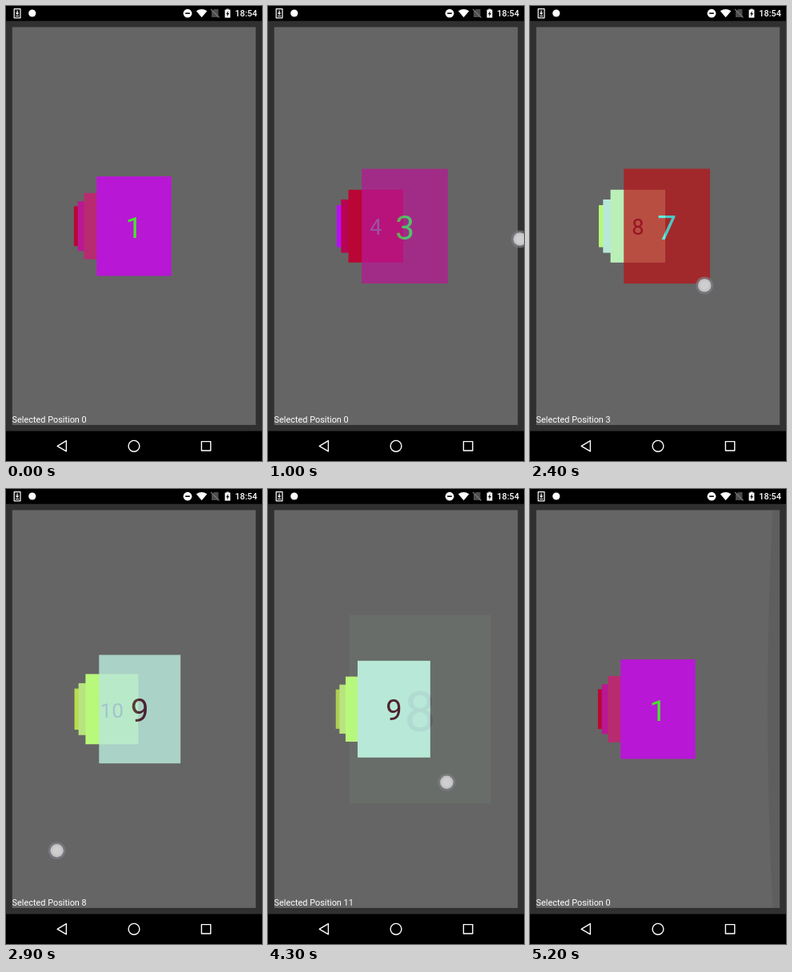
An HTML page with a canvas that plays this animation: 320x569 px, repeating every 5700 ms.

```html
<!DOCTYPE html>
<html lang="en">
<head>
<meta charset="utf-8">
<title>Card stack</title>
<style>
html, body { margin: 0; width: 100%; height: 100%; overflow: hidden; background: #000; }
canvas { display: block; width: 320px; height: 569px; }
</style>
</head>
<body>
<canvas id="stage" width="320" height="569"></canvas>
<script>
const W = 320, H = 569;
const screen2d = document.getElementById('stage').getContext('2d');
const layer = Object.assign(document.createElement('canvas'), { width: W, height: H });
const layer2d = layer.getContext('2d');
let ctx = screen2d;

const LOOP = 5700, STEP = 100, LAST = 5200;
const FONT = 'Roboto, sans-serif';
const PANEL = { x: 7.8, y: 26.4, w: 304.4, h: 497.5 };
const CARD = { w: 93.4, h: 124.4, x: 160, y: 275.3, size: 37.33, baseline: 14.6 };
const DRAG = 94; // finger pixels per card

const COLORS = ['#b817d5', '#b82b70', '#b81894', '#ba0634', '#b80452', '#b80ef8',
  '#b81418', '#baf0b8', '#b8e8da', '#b8f87a', '#b8e480', '#b8dc50'];

// Each swipe eases the stack to `end`; the finger starts at (x, y)
const SWIPES = [
  { from: 370, to: 1300, end: 3, x: 102, y: 398, settles: true },
  { from: 1390, to: 2000, end: 5, x: 136, y: 384 },
  { from: 2075, to: 2800, end: 8, x: 99, y: 409, settles: true },
  { from: 2800, to: 3500, end: 11, x: 48, y: 460, settles: true },
  { from: 3800, to: 4195, end: 8.45, x: 272, y: 359 },
  { from: 4195, to: 4900, end: 0, x: 271, y: 343, settles: true }
];

const clamp = v => Math.max(0, Math.min(1, v));
const smooth = u => u * u * (3 - 2 * u);

function stackAt(t) {
  let pos = 0, selected = 0, finger = null;
  for (const s of SWIPES) {
    if (t < s.from) break;
    const moved = (s.end - pos) * smooth(clamp((t - s.from) / (s.to - s.from)));
    pos += moved;
    finger = t < s.to ? { x: s.x + DRAG * moved, y: s.y - DRAG * moved / 2 } : null;
    if (s.settles && t >= s.to) selected = s.end;
  }
  return { pos, selected, finger };
}

function rect(x, y, w, h, color) {
  ctx.fillStyle = color;
  ctx.fillRect(x, y, w, h);
}

function disc(x, y, r, color) {
  ctx.fillStyle = color;
  ctx.beginPath();
  ctx.arc(x, y, r, 0, Math.PI * 2);
  ctx.fill();
}

function poly(points, color) {
  ctx.fillStyle = color;
  ctx.beginPath();
  points.forEach(([x, y]) => ctx.lineTo(x, y));
  ctx.closePath();
  ctx.fill();
}

function label(text, x, y, size, color, align = 'left', weight = 400) {
  ctx.font = `${weight} ${size}px ${FONT}`;
  ctx.textAlign = align;
  ctx.fillStyle = color;
  ctx.fillText(text, x, y);
}

function inverse(hex) {
  const value = 0xffffff - parseInt(hex.slice(1), 16);
  return '#' + value.toString(16).padStart(6, '0');
}

// The card and its number fade as one layer
function drawCard(index, d) {
  const scale = 1 / (1 + d / 2);
  const x = CARD.x - Math.sign(d) * DRAG * (1 - 1 / (1 + Math.abs(d) / 2));
  const w = CARD.w * scale, h = CARD.h * scale;
  ctx = layer2d;
  ctx.clearRect(0, 0, W, H);
  rect(x - w / 2, CARD.y - h / 2, w, h, COLORS[index]);
  label(index + 1, x, CARD.y + CARD.baseline * scale, CARD.size * scale,
    inverse(COLORS[index]), 'center');
  ctx = screen2d;
  ctx.globalAlpha = clamp(Math.min(1 + d, 7 - 2 * d));
  ctx.drawImage(layer, 0, 0);
  ctx.globalAlpha = 1;
}

function drawStack(pos) {
  for (let i = COLORS.length - 1; i >= 0; i--) {
    const d = i - pos;
    if (d > -1 && d < 3.5) drawCard(i, d);
  }
}

function drawGlow(t) {
  if (t < 4900) return;
  const fade = (1 - clamp((t - 4900) / 600)) ** 2;
  const r = 747, half = PANEL.h / 2, right = PANEL.x + PANEL.w;
  const edge = [[right, PANEL.y]];
  for (let u = -half; u <= half; u += half / 20) {
    edge.push([right - .6 * fade * (100 - r + Math.sqrt(r * r - u * u)), CARD.y + u]);
  }
  edge.push([right, PANEL.y + PANEL.h]);
  poly(edge, `rgba(33,33,33,${.4 * fade})`);
}

function drawFinger(finger) {
  if (!finger || finger.x < 45 || finger.x > W) return;
  disc(finger.x, finger.y, 11, 'rgba(125,125,132,.7)');
  disc(finger.x, finger.y, 8.2, '#c4c4c6');
  disc(finger.x, finger.y, 5.5, '#cecece');
}

function drawStatusBar() {
  rect(0, 0, W, 18.7, '#000');
  ctx.strokeStyle = '#fff';
  ctx.lineWidth = 1.2;
  ctx.strokeRect(10.2, 3.6, 7.8, 11.2);
  rect(13.5, 5.5, 1.2, 4, '#fff');
  poly([[11.8, 8.5], [16.4, 8.5], [14.1, 11.2]], '#fff');
  rect(12, 12, 4.2, 1, '#fff');
  disc(32.8, 9, 4.6, '#fff');

  disc(227, 9.2, 5.4, '#fff');
  rect(224.2, 8.4, 5.6, 1.6, '#000');

  ctx.fillStyle = '#fff';
  ctx.beginPath();
  ctx.moveTo(244.6, 14.2);
  ctx.lineTo(237.8, 6.2);
  ctx.quadraticCurveTo(244.6, 1.8, 251.4, 6.2);
  ctx.fill();

  poly([[260, 4], [265.5, 4], [265.5, 14], [257, 14], [257, 7]], '#4c4c4c');
  ctx.strokeStyle = '#777';
  ctx.beginPath();
  ctx.moveTo(256, 4);
  ctx.lineTo(266.5, 14.5);
  ctx.stroke();

  rect(273.6, 4.6, 6.8, 10, '#fff');
  rect(275.4, 3.6, 3.2, 1.2, '#fff');
  poly([[277.8, 6], [275, 10.2], [276.7, 10.2], [276.2, 13.4], [279, 9.1], [277.4, 9.1]], '#000');
  label('18:54', 314, 13.4, 10.9, '#fff', 'right', 500);
}

function drawNavBar() {
  const y = 550.3;
  rect(0, 531.6, W, 38, '#000');
  ctx.strokeStyle = '#fff';
  ctx.lineWidth = 1.4;
  ctx.lineJoin = 'round';
  ctx.beginPath();
  ctx.moveTo(64.2, y);
  ctx.lineTo(75.4, y - 6.6);
  ctx.lineTo(75.4, y + 6.6);
  ctx.closePath();
  ctx.stroke();
  ctx.beginPath();
  ctx.arc(160, y, 6.9, 0, Math.PI * 2);
  ctx.stroke();
  ctx.strokeRect(244.4, y - 5.7, 11.4, 11.4);
}

function draw(t) {
  const { pos, selected, finger } = stackAt(t);
  rect(0, 0, W, H, '#303030');
  rect(PANEL.x, PANEL.y, PANEL.w, PANEL.h, '#656565');
  drawStack(pos);
  drawGlow(t);
  label('Selected Position ' + selected, 7.6, 520.8, 10.9, '#fff');
  drawStatusBar();
  drawNavBar();
  drawFinger(finger);
}

const start = performance.now();
function tick() {
  const ms = (performance.now() - start) % LOOP;
  draw(Math.min(LAST, Math.floor(ms / STEP) * STEP));
  requestAnimationFrame(tick);
}
tick();
</script>
</body>
</html>
```
